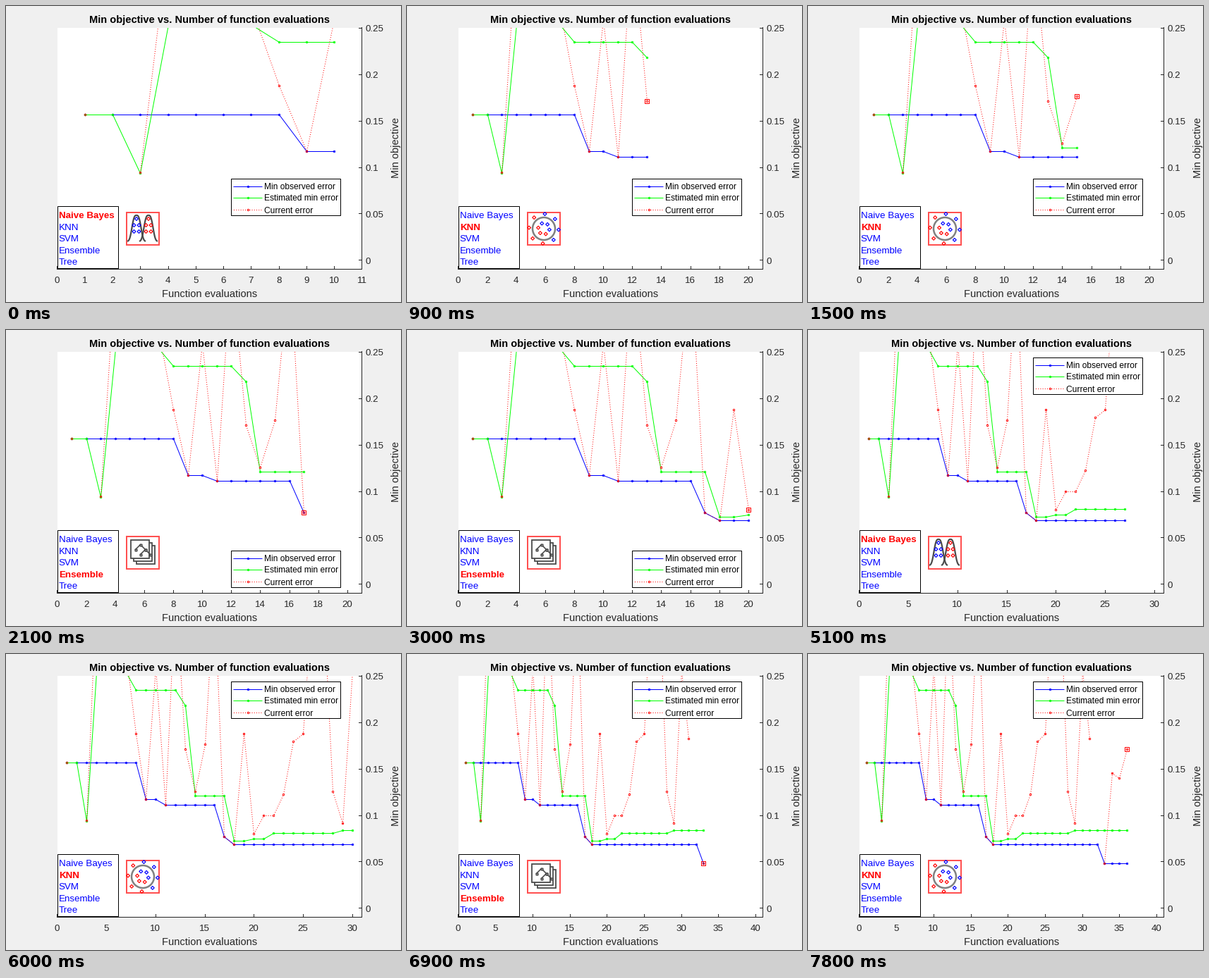
These frames come from a looping animation (560x420 px, 8000 ms). A matplotlib script:

```python
import numpy as np
import matplotlib.pyplot as plt
from matplotlib.animation import FuncAnimation
from matplotlib.patches import Circle, Rectangle

W, H, DPI = 560, 420, 100
PX = 72 / DPI  # points per pixel
LEFT, RIGHT, TOP, BOTTOM = 72.5, 504.5, 31, 373.5
INK, BLUE, GREEN, RED, GREY = "#262626", "#0000ff", "#00ff00", "#ff0000", "#4a4a4a"
LEARNERS = ["Naive Bayes", "KNN", "SVM", "Ensemble", "Tree"]
FIRST, LAST = 10, 36
SAMPLES = 351
OFF_SCALE = 121

# Misclassified samples per evaluation; steps left out lie above the plot.
missed = {1: 55, 2: np.nan, 3: 33, 7: 96, 8: 66, 9: 41, 10: 91, 11: 39, 13: 60,
          14: 44, 15: 62, 17: 27, 18: 24, 19: 66, 20: 28, 21: 35, 22: 35, 23: 43,
          24: 63, 25: 66, 28: 44, 29: 32, 30: 90, 31: 64, 32: np.nan, 33: 17,
          34: 51, 35: 49, 36: 60}
# The estimate holds its value until the next key step.
estimate_keys = {1: .1567, 3: .094, 4: .254, 8: .2347, 13: .2183, 14: .1206,
                 18: .0725, 20: .075, 22: .0807, 29: .0835}

steps = np.arange(1, LAST + 1)
current = np.array([missed.get(n, OFF_SCALE) for n in steps]) / SAMPLES
observed = np.fmin.accumulate(np.where(steps == 3, np.nan, current))
held = np.searchsorted(list(estimate_keys), steps, side="right") - 1
estimated = np.array(list(estimate_keys.values()))[held]

SERIES = [("Min observed error", observed, BLUE, "-"),
          ("Estimated min error", estimated, GREEN, "-"),
          ("Current error", current, RED, (0, (1, 2.2)))]

plt.rcParams["path.snap"] = False
fig = plt.figure(figsize=(W / DPI, H / DPI), dpi=DPI, facecolor="#f0f0f0")
ax = fig.add_axes([0, 0, 1, 1])


def pixel(v):
    return np.floor(v + .5) + .5


def x_px(step, x_max):
    return pixel(LEFT + step / x_max * (RIGHT - LEFT) - .01)


def y_px(value):
    return pixel(BOTTOM - (value + .01) / .26 * (BOTTOM - TOP))


def line(x, y, color=INK, width=1, **kw):
    return ax.plot(x, y, color=color, lw=width * PX, **kw)[0]


def box(x0, y0, x1, y1, edge="black", width=1, z=5):
    return ax.add_patch(Rectangle((x0, y0), x1 - x0, y1 - y0, fc="white", ec=edge,
                                  lw=width * PX, zorder=z, joinstyle="miter"))


def text(x, y, label, size, color=INK, **kw):
    ax.text(x, y, label, fontsize=size * PX, color=color, zorder=6, va="baseline",
            family="Liberation Sans", **kw)


def dots(x, y, color, marker="o", size=2.5, width=.9, face="none", z=7):
    return ax.scatter(x, y, s=(size * PX) ** 2, marker=marker, facecolors=face,
                      edgecolors=color, linewidths=width * PX, zorder=z, snap=False)


def diamonds(x, y, color):
    dots(x, y, color, "D", 3.4, 1.2)


def branch_tree(x, y, step, turns, size):
    """Fork at each level, then go on from the child on the given side."""
    for turn in turns:
        line([x - step, x, x + step], [y + step, y, y + step], GREY, 1.6, zorder=6)
        dots([x - step, x, x + step], [y + step, y, y + step], GREY, "s", size, 1.6, "white")
        x, y = x + turn * step, y + step


def bayes_icon():
    x = np.linspace(-12, 12, 60)
    for center, color in ((185, BLUE), (202, RED)):
        line(center + x, 334 - 37 * np.exp(-np.abs(x / 7.5) ** 3), GREY, 2.2, zorder=6)
        row = np.arange(5)
        diamonds(center + 3.5 * (-1) ** row * (row > 0), 302 + 9 * ((row + 1) // 2), color)


def knn_icon():
    ax.add_patch(Circle((194, 316), 16, fill=False, ec="#808080", lw=2.5 * PX, zorder=6))
    for count, radius, start in ((6, 8, -110), (8, 21, -131)):
        angle = np.radians(start + 360 / count * np.arange(count))
        dx, dy = radius * np.cos(angle), radius * np.sin(angle)
        blue = dx > dy / 2
        diamonds(194 + dx[blue], 316 + dy[blue], BLUE)
        diamonds(194 + dx[~blue], 316 + dy[~blue], RED)


def ensemble_icon():
    for shift in (8, 4, 0):
        box(177 + shift, 298 + shift, 203 + shift, 324 + shift, GREY, 1.8, z=6)
    branch_tree(190.5, 304.5, 7, (1, -1), 2.5)


def tree_icon():
    branch_tree(188, 300, 11, (1, -1, 1), 4.5)


ICONS = {"Naive Bayes": bayes_icon, "KNN": knn_icon,
         "Ensemble": ensemble_icon, "Tree": tree_icon}


def learner(n):
    """The smaller the error, the stronger the learner that was tried."""
    rank = np.digitize(current[n - 1], [.1, .15, .258])
    return ["Ensemble", "Tree", "KNN", "Naive Bayes"][rank]


def draw_axes(x_max):
    line([LEFT, RIGHT], [BOTTOM] * 2, zorder=4)
    line([RIGHT] * 2, [TOP - .5, BOTTOM], zorder=4)
    for tick in range(0, x_max + 1, {11: 1, 21: 2}.get(x_max, 5)):
        x = x_px(tick, x_max)
        line([x, x], [BOTTOM, BOTTOM - 4], zorder=4)
        text(LEFT + tick / x_max * (RIGHT - LEFT), 393, str(tick), 13.33, ha="center")
    for tick in np.arange(6) * .05:
        y = y_px(tick)
        line([RIGHT, RIGHT - 4], [y, y], zorder=4)
        text(510, y + 5, f"{tick:.2g}", 13.33)
    text(288.5, 24, "Min objective vs. Number of function evaluations", 14.67,
         "black", ha="center", weight="bold")
    text(289, 413, "Function evaluations", 14.67, ha="center")
    text(557.5, 201.5, "Min objective", 14.67, ha="center", rotation=90,
         rotation_mode="anchor")


def draw_series(n, x_max, area):
    x = x_px(steps[:n], x_max)
    for z, (_, values, color, style) in enumerate(SERIES, 2):
        y = y_px(values[:n])
        line(x, y, color, ls=style, zorder=z / 2).set_clip_path(area)
        dots(x, y, color, z=z / 2 + .1).set_clip_path(area)
    dots(x[-1:], y[-1:], RED, "s", 6, 1, z=3).set_clip_path(area)


def draw_legend(top):
    box(319.5, top, 474.5, top + 52)
    for row, (label, _, color, style) in enumerate(SERIES):
        y = pixel(top + 10 + 16.5 * row)
        line([323, 363], [y, y], color, ls=style, zorder=6)
        dots([343.5], [y], color)
        text(366, y + 4, label, 12, "black")


def draw_learners(chosen):
    box(73.5, 284.5, 159.5, 372.5)
    for row, name in enumerate(LEARNERS):
        color, weight = (RED, "bold") if name == chosen else (BLUE, "normal")
        text(74.7, 301.3 + 16.5 * row, name, 13.33, color, weight=weight)
    box(171, 293, 217, 339, "#ff5050", 2)
    ICONS[chosen]()


def draw(frame):
    n = FIRST + frame // 3
    x_max = -(-n // 10) * 10 + 1
    ax.clear()
    ax.set(xlim=(0, W), ylim=(H, 0))
    ax.axis("off")
    area = box(LEFT + .5, TOP, RIGHT, BOTTOM, "none", 0, z=.5)
    draw_axes(x_max)
    draw_series(n, x_max, area)
    draw_legend(245.5 if n < 17 else 313.5 if n < 21 else 39.5)
    draw_learners(learner(n))
    return []


anim = FuncAnimation(fig, draw, frames=80, interval=100, init_func=lambda: [], repeat=True)
plt.show()
```
